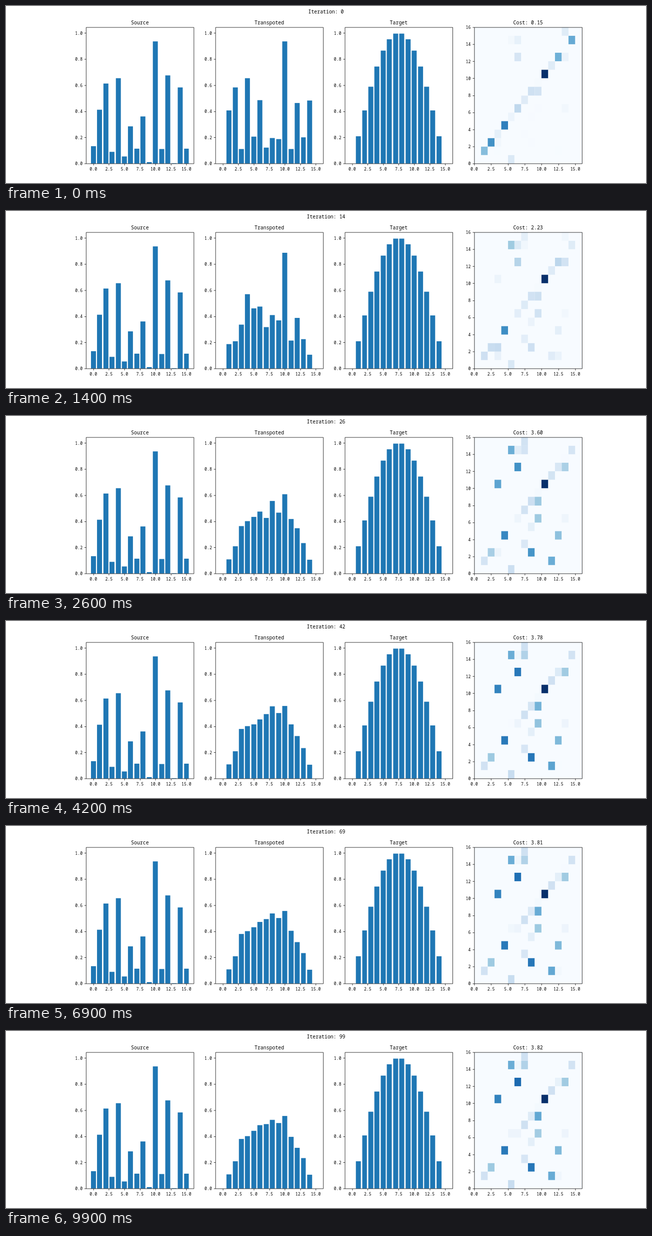
Write an HTML page that moves like this. It is 1280x356 px and loops after 10000 ms.

```html
<!DOCTYPE html>
<html lang="en">
<head>
<meta charset="utf-8">
<title>Transport plan</title>
<style>
  html, body { margin: 0; width: 100%; height: 100%; overflow: hidden; background: #fff; }
  svg { display: block; width: 1280px; height: 356px; }
  text { font: 11.57px "Noto Sans Mono", monospace; text-anchor: middle; }
  text.title { font-size: 13.89px; }
  text.y { text-anchor: end; }
  .axis { fill: none; stroke: #000; stroke-width: 1.11; }
  .bar { fill: #1f77b4; }
</style>
</head>
<body>
<svg id="stage" viewBox="0 0 1800 500" preserveAspectRatio="none"></svg>
<script>
// The figure is laid out on an 1800 x 500 grid and scaled to the stage.
const stage = document.getElementById('stage');
const N = 16, STEP = 100, STEPS = 100;
const LEFT = 225, W = 1395 / 4.6, GAP = W * 1.2, TOP = 60, BOTTOM = 445, H = BOTTOM - TOP;
const UNIT_X = W / 17.38, UNIT_Y = H / 1.0442;
const CELL_X = W / N, CELL_Y = H / N;

const source = [.132, .413, .613, .09, .653, .054, .285, .114, .361, .01, .936, .111, .676, .003, .584, .114];
const target = source.map((_, i) => Math.sin(Math.PI * i / 15));

// All mass begins on the diagonal. Each wave moves shares of a row between
// its columns: [row, to, share, from = row].
const waves = [
  { begin: -2, end: -1, moves: [[0, 5, 1], [6, 13, .1], [8, 9, .48], [12, 6, .23], [12, 13, .08], [14, 6, .12], [15, 13, 1]] },
  { begin: -2, end: 10, moves: [[2, 3, .66], [3, 7, 1], [5, 8, 1], [14, 5, .58], [14, 6, .12]] },
  { begin: -2, end: 22, moves: [[1, 3, .4], [1, 12, .34], [6, 9, .8], [12, 13, .22], [15, 7, 1, 13]] },
  { begin: -2, end: 32, moves: [[2, 8, .66, 3], [12, 6, .36]] },
  { begin: 7, end: 25, moves: [[1, 11, .4, 3], [1, 11, .34, 12], [4, 12, .385]] },
  { begin: 9, end: 31, moves: [[10, 3, .405]] },
  { begin: 4, end: 42, moves: [[8, 9, .25], [14, 7, .1, 5], [14, 7, .2, 6]] },
  { begin: 30, end: 95, moves: [[1, 12, .05, 11], [6, 5, .1, 9], [8, 9, .08], [12, 6, .05]] }
];
const costs = [[0, .15], [8, 1.42], [20, 3.05], [26, 3.6], [42, 3.78], [69, 3.81], [99, 3.82]];

const clamp = x => Math.max(0, Math.min(1, x));
const smooth = x => x * x * (3 - 2 * x);
const mix = (a, b, s) => a + (b - a) * s;

function planAt(step) {
  const plan = source.map((mass, row) => source.map((_, col) => row === col ? mass : 0));
  for (const { begin, end, moves } of waves) {
    const done = smooth(clamp((step - begin) / (end - begin)));
    for (const [row, to, share, from = row] of moves) {
      const mass = source[row] * share * done;
      plan[row][from] -= mass;
      plan[row][to] += mass;
    }
  }
  return plan;
}

function costAt(step) {
  const i = Math.max(1, costs.findIndex(([t]) => t >= step));
  const [t0, a] = costs[i - 1], [t1, b] = costs[i];
  return mix(a, b, (step - t0) / (t1 - t0));
}

const BLUES = [[247, 251, 255], [222, 235, 247], [198, 219, 239], [158, 202, 225], [107, 174, 214],
  [66, 146, 198], [33, 113, 181], [8, 81, 156], [8, 48, 107]];
function blue(x) {
  const p = clamp(x) * 8, i = Math.min(7, Math.floor(p));
  return `rgb(${BLUES[i].map((c, k) => Math.round(mix(c, BLUES[i + 1][k], p - i)))})`;
}

function add(tag, attrs, text) {
  const el = document.createElementNS('http://www.w3.org/2000/svg', tag);
  for (const k in attrs) el.setAttribute(k, attrs[k]);
  if (text !== undefined) el.textContent = text;
  return stage.appendChild(el);
}
const label = (x, y, text, cls = '') => add('text', { x, y, class: cls }, text);
const snap = v => Math.round(v) + .5;

function box(x0, y0, x1, y1, attrs) {
  const [l, t, r, b] = [x0, y0, x1, y1].map(Math.round);
  return add('rect', { x: l, y: t, width: r - l, height: b - t, ...attrs });
}

function axes(n, xAt, yAt, yTicks, title) {
  const x0 = LEFT + n * GAP, l = snap(x0), b = snap(BOTTOM), r = snap(x0 + W), t = snap(TOP);
  let path = `M${l} ${t}H${r}V${b}H${l}Z`;
  for (let v = 0; v <= 15; v += 2.5) {
    path += `M${snap(xAt(v))} ${b}v4.86`;
    label(xAt(v), 465.3, v.toFixed(1));
  }
  for (const tick of yTicks) {
    const y = yAt(+tick);
    path += `M${l} ${snap(y)}h-4.86`;
    label(x0 - 9.72, y + 4.7, tick, 'y');
  }
  add('path', { class: 'axis', d: path });
  return label(x0 + W / 2, 52, title, 'title');
}

const ticks = (count, step, digits) => Array.from({ length: count }, (_, i) => (i * step).toFixed(digits));
const barY = v => BOTTOM - v * UNIT_Y;
function setBar(bar, v) {
  const y = Math.round(barY(v));
  bar.setAttribute('y', y);
  bar.setAttribute('height', BOTTOM - y);
}
function barPanel(n, values, title) {
  const xAt = v => LEFT + n * GAP + (v + 1.19) * UNIT_X;
  const bars = values.map((v, i) => box(xAt(i - .4), barY(Math.max(0, v)), xAt(i + .4), BOTTOM, { class: 'bar' }));
  axes(n, xAt, barY, ticks(6, .2, 1), title);
  return bars;
}

const heading = label(900, 21.2, '', 'title');
barPanel(0, source, 'Source');
const moved = barPanel(1, source, 'Transpoted');
barPanel(2, target, 'Target');

const heatX = v => LEFT + 3 * GAP + v * CELL_X;
const heatY = v => BOTTOM - v * CELL_Y;
box(heatX(0), TOP, heatX(N), BOTTOM, { fill: blue(0) });
const cells = source.map((_, row) => source.map((_, col) =>
  box(heatX(col), heatY(row + 1), heatX(col + 1), heatY(row))));
const costLabel = axes(3, heatX, heatY, ticks(9, 2, 0), '');

function draw(step) {
  const plan = planAt(step), max = Math.max(...plan.flat());
  cells.forEach((line, row) => line.forEach((cell, col) => cell.setAttribute('fill', blue(plan[row][col] / max))));
  moved.forEach((bar, col) => setBar(bar, plan.reduce((sum, line) => sum + line[col], 0)));
  heading.textContent = `Iteration: ${step}`;
  costLabel.textContent = `Cost: ${costAt(step).toFixed(2)}`;
}

let shown = -1;
function tick() {
  const step = Math.floor(performance.now() / STEP) % STEPS;
  if (step !== shown) draw(shown = step);
  requestAnimationFrame(tick);
}
tick();
</script>
</body>
</html>
```
